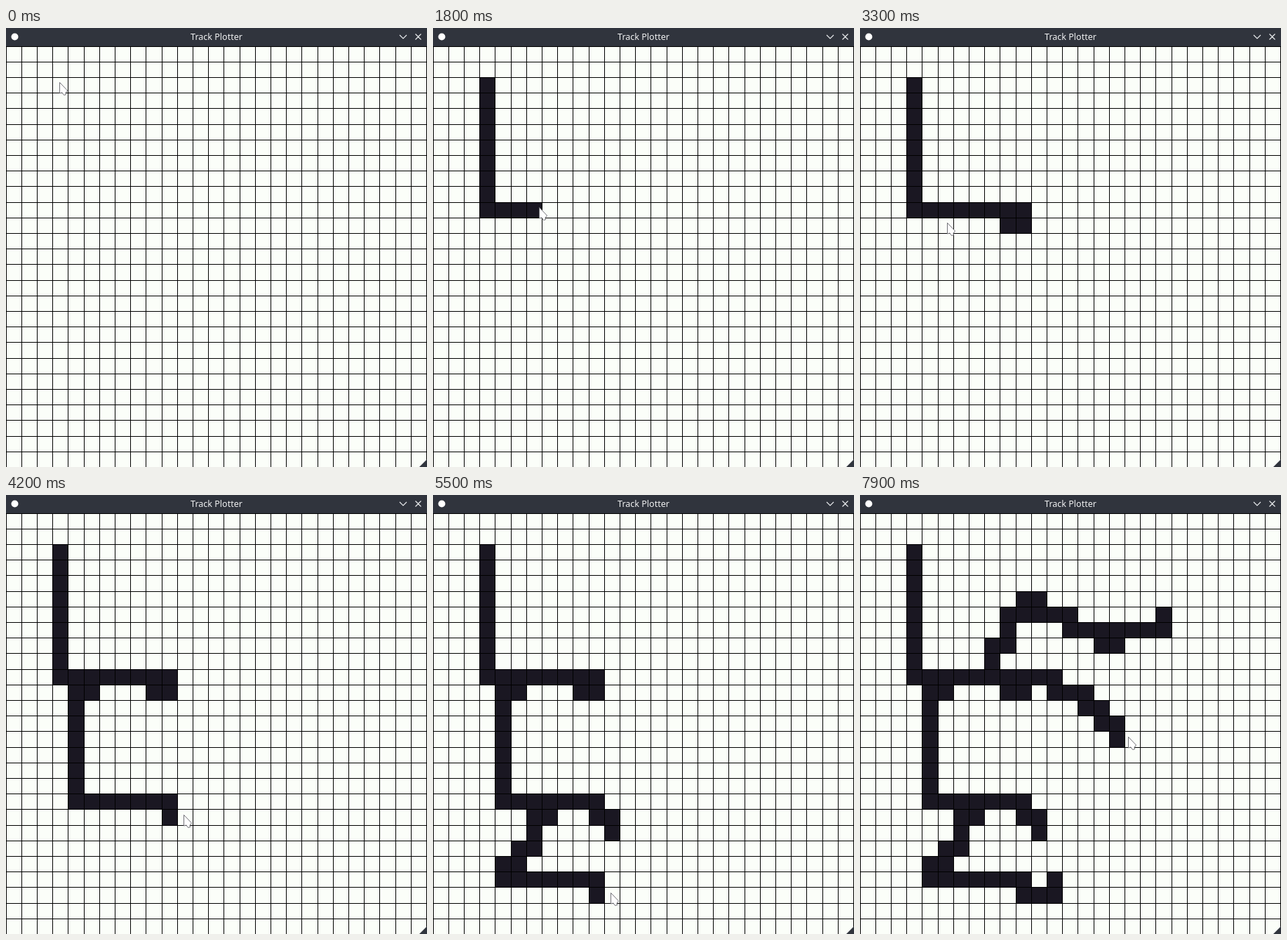
Animation of 600x625 px, one loop 8 s. Source, as an HTML page with a canvas:

```html
<!DOCTYPE html>
<html lang="en">
<head>
<meta charset="utf-8">
<title>Track Plotter</title>
<style>
  html, body { margin: 0; width: 100%; height: 100%; overflow: hidden; background: #fbfef9; }
  canvas { position: absolute; left: 0; top: 0; }
  header {
    position: absolute; left: 0; top: 0; width: 600px; height: 26px; background: #30343d;
    color: #f0f1f2; font: 12.5px/25px "Noto Sans", sans-serif; text-align: center;
  }
  header svg { position: absolute; left: 0; top: 0; }
</style>
</head>
<body>
<canvas width="600" height="625"></canvas>
<header>Track Plotter
  <svg width="600" height="26" fill="none" stroke="#eceef0" stroke-width="1.1">
    <circle cx="12.5" cy="12.5" r="5" fill="#fff" stroke="none"/>
    <path d="M561 10l5 5 5-5M583.5 8.5l8 8m0-8l-8 8"/>
  </svg>
</header>
<script>
const LOOP = 8000, STEP = 100, PITCH = 22.2, TOP = 26;
const LEAD = 40, GLIDE = 400;  // ms: pointer ahead of the paint, longest move between strokes
const ctx = document.querySelector('canvas').getContext('2d');
const arrow = new Path2D('M0 0V15.5L3.5 14.5 6 18 9 17.3 8.5 14.8 11 11.5Z');
const grip = new Path2D('M600 614V625H589Z');

// Each stroke walks the grid from its first cell: Up, Down, Left, Right
const strokes = [
  { start: 450, pace: 122, col: 3, row: 2, walk: 'DDDDDDDDRRRRRRRDL' },
  { start: 3360, pace: 50, col: 5, row: 11, walk: 'LDDDDDDD' },
  { start: 3750, pace: 70, col: 5, row: 18, walk: 'RRRRRDRD' },
  { start: 4700, pace: 56, col: 7, row: 19, walk: 'LDDLDLDRRRRRRDRRU' },
  { start: 6030, pace: 50, col: 8, row: 9, walk: 'URUURURDRRDRRDRURRRU' },
  { start: 7430, pace: 52, col: 11, row: 10, walk: 'RDRRDRDRDR' }
];

const moves = { U: [0, -1], D: [0, 1], L: [-1, 0], R: [1, 0] };
const cells = strokes.flatMap(({ start, pace, col, row, walk }) => {
  const list = [{ at: start, col, row }];
  [...walk].forEach((step, i) => {
    const [dx, dy] = moves[step];
    list.push({ at: start + pace * (i + 1), col: col += dx, row: row += dy });
  });
  return list;
});

const gx = col => Math.floor(col * PITCH + 0.01);
const gy = row => TOP + gx(row);

// Follows the walked cells; waits, then glides to the next stroke
function pointer(time) {
  const t = time + LEAD;
  const i = cells.findIndex(c => c.at > t);
  const b = cells.at(i), a = cells[i - 1] || b;
  const span = Math.min(b.at - a.at, GLIDE) || 1;
  const k = Math.min(1, Math.max(0, 1 - (b.at - t) / span));
  const mix = key => a[key] + (b[key] - a[key]) * k;
  return [mix('col') * PITCH + 9, TOP + mix('row') * PITCH + 7];
}

function draw(t) {
  ctx.fillStyle = '#fbfef9';
  ctx.fillRect(0, 0, 600, 625);

  ctx.fillStyle = '#1a1722';
  for (const { at, col, row } of cells) {
    if (at <= t) ctx.fillRect(gx(col), gy(row), gx(col + 1) - gx(col), gy(row + 1) - gy(row));
  }

  ctx.fillStyle = '#000';
  for (let i = 0; i < 28; i++) {
    ctx.fillRect(gx(i), TOP, 1, 599);
    ctx.fillRect(0, gy(i), 600, 1);
  }

  ctx.fillStyle = '#30343d';
  ctx.fill(grip);

  const [x, y] = pointer(t);
  ctx.save();
  ctx.translate(Math.round(x) + 0.5, Math.round(y) + 0.5);
  ctx.fillStyle = '#fff';
  ctx.fill(arrow);
  ctx.strokeStyle = '#707076';
  ctx.stroke(arrow);
  ctx.restore();
}

function frame() {
  const t = performance.now() % LOOP;
  draw(Math.floor(t / STEP) * STEP);
  requestAnimationFrame(frame);
}
frame();
</script>
</body>
</html>
```
